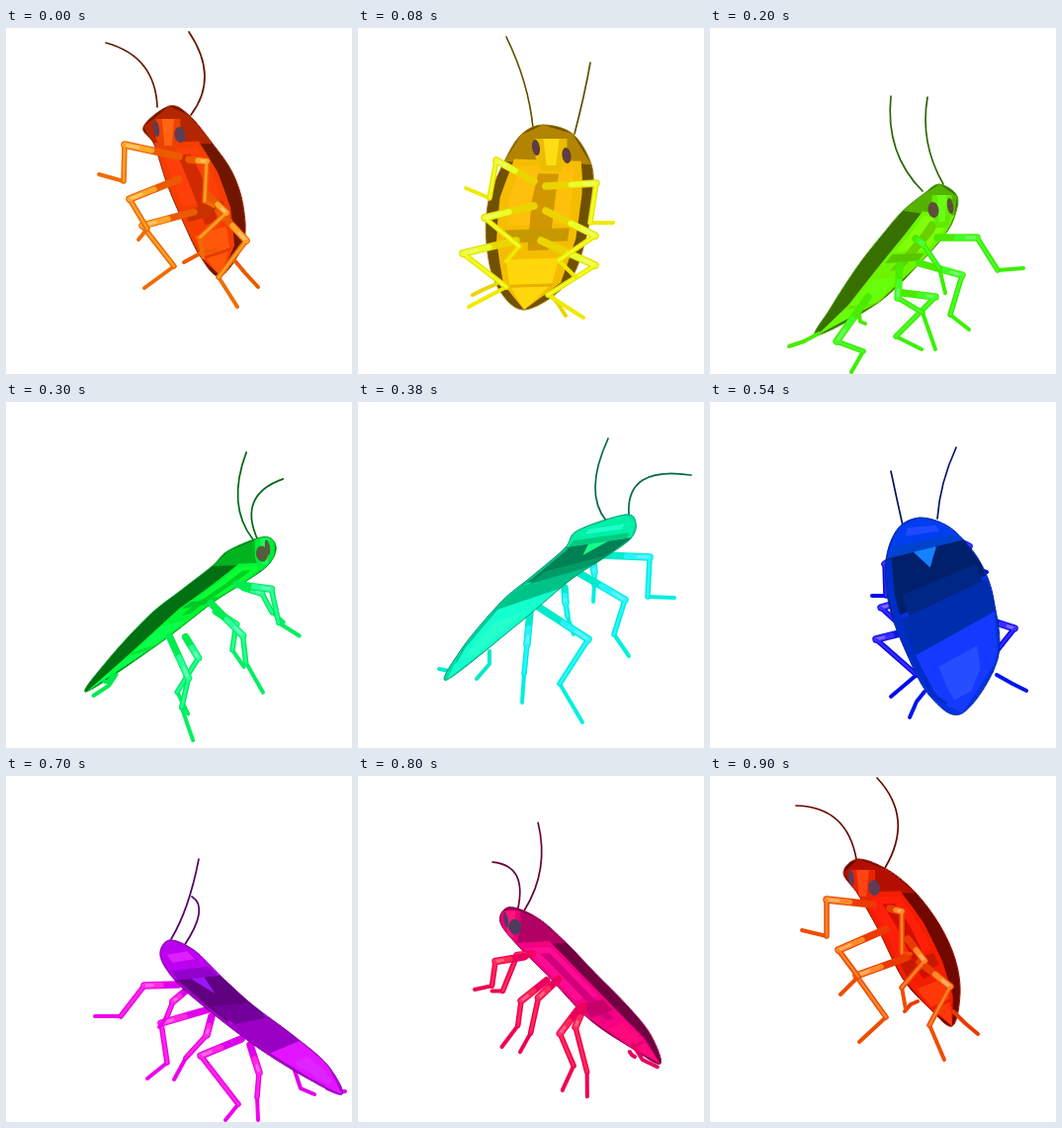
Recreate the animation shown at these times as an HTML page with a canvas. Size 350x350 px, loop 920 ms.

```html
<!DOCTYPE html>
<html lang="en">
<head>
<meta charset="utf-8">
<title>Turning cockroach</title>
<style>
html, body { margin: 0; width: 100%; height: 100%; overflow: hidden; background: #fff; }
canvas { display: block; }
</style>
</head>
<body>
<canvas id="stage" width="350" height="350"></canvas>
<script>
const LOOP = 920, STEP = 20;
const g = document.getElementById('stage').getContext('2d');
g.lineCap = g.lineJoin = 'round';

// Key poses, x,y pairs. Outline runs clockwise from head (0) to tail (6).
// Legs: hip, knee, ankle, foot. Feelers: base, middle, tip.
const poses = [];
const pose = (t, parts) => poses.push({ t, parts });

pose(0, {
  body: [165,79, 185,88, 209,117, 229,146, 240,180, 240,218, 217,251, 197,232, 180,198, 163,158, 150,118, 139,100],
  lFront: [175,130, 120,118, 119,155, 94,148],
  lMid: [175,153, 125,173, 143,203, 134,214],
  lHind: [190,186, 138,200, 170,241, 140,263],
  rFront: [185,133, 203,135, 201,175, 210,180],
  rMid: [205,170, 223,187, 196,212, 199,232],
  rHind: [215,185, 243,215, 215,252, 234,282],
  lTail: [212,225, 200,226, 180,237],
  rTail: [232,236, 242,248, 255,262],
  lFeeler: [153,80, 139,38, 101,15],
  rFeeler: [187,88, 201,48, 185,4],
  eyes: [152,102, 176,108]
});
pose(80, {
  body: [187,98, 217,107, 236,138, 237,170, 230,215, 212,258, 168,285, 140,260, 130,218, 132,175, 148,135, 165,108],
  lFront: [178,155, 140,134, 133,172, 109,162],
  lMid: [178,180, 128,192, 163,221, 150,236],
  lHind: [160,215, 106,228, 150,262, 112,282],
  rFront: [190,160, 241,157, 235,197, 258,197],
  rMid: [190,185, 240,210, 203,235, 220,252],
  rHind: [185,215, 240,240, 192,270, 228,293],
  lTail: [140,259, 128,264, 116,270],
  rTail: [195,270, 203,280, 210,291],
  lFeeler: [177,101, 168,55, 150,9],
  rFeeler: [219,107, 228,70, 235,35],
  eyes: [180,121, 211,129]
});
pose(200, {
  body: [232,158, 250,170, 247,192, 237,210, 215,235, 170,278, 108,311, 122,283, 150,240, 176,207, 195,185, 216,168],
  lFront: [208,213, 215,218, 232,243, 238,268],
  lMid: [192,240, 190,273, 215,288, 228,325],
  lHind: [160,272, 128,317, 155,327, 143,348],
  rFront: [230,212, 270,212, 291,245, 317,243],
  rMid: [212,238, 255,250, 243,290, 262,305],
  rHind: [195,268, 228,272, 188,312, 214,325],
  lTail: [150,284, 152,297, 157,299],
  rTail: [110,309, 95,317, 80,322],
  lFeeler: [215,165, 188,122, 183,69],
  rFeeler: [236,158, 220,115, 220,70],
  eyes: [226,184, 243,180]
});
pose(380, {
  body: [270,114, 281,122, 276,138, 250,157, 215,180, 165,222, 90,281, 106,248, 145,202, 175,177, 209,148, 222,130],
  lFront: [248,155, 295,157, 293,197, 320,198],
  lMid: [222,172, 270,200, 259,235, 274,257],
  lHind: [182,207, 233,240, 204,285, 227,324],
  rFront: [238,163, 239,172, 239,185, 238,202],
  rMid: [209,188, 210,203, 212,217, 218,235],
  rHind: [174,212, 171,245, 168,275, 166,304],
  lTail: [100,268, 92,272, 82,270],
  rTail: [133,252, 133,265, 120,280],
  lFeeler: [274,114, 288,79, 337,74],
  rFeeler: [251,120, 240,85, 253,37],
  eyes: [272,124, 268,118]
});
pose(540, {
  body: [212,117, 238,124, 257,140, 275,165, 287,200, 291,260, 255,315, 222,297, 197,250, 181,205, 178,160, 190,128],
  lFront: [250,140, 262,146, 262,165, 280,172],
  lMid: [265,190, 278,200, 275,215, 270,230],
  lHind: [280,220, 308,229, 285,258, 285,272],
  rFront: [190,155, 177,164, 178,196, 164,196],
  rMid: [200,200, 173,208, 195,228, 200,240],
  rHind: [200,232, 168,240, 209,276, 183,298],
  lTail: [290,276, 306,285, 320,292],
  rTail: [217,293, 209,303, 202,319],
  lFeeler: [230,118, 236,82, 249,46],
  rFeeler: [195,125, 189,98, 183,70],
  eyes: [225,125, 200,125]
});
pose(700, {
  body: [165,166, 190,176, 218,203, 250,232, 290,262, 325,292, 340,322, 305,306, 255,275, 205,237, 172,208, 156,182],
  lFront: [182,217, 169,228, 163,243, 155,254],
  lMid: [208,243, 203,262, 182,285, 170,307],
  lHind: [247,272, 256,300, 254,325, 255,348],
  rFront: [174,211, 140,212, 116,243, 90,243],
  rMid: [205,236, 157,250, 163,290, 143,306],
  rHind: [238,266, 197,283, 235,332, 222,348],
  lTail: [325,316, 335,320, 343,319],
  rTail: [292,298, 298,316, 312,322],
  lFeeler: [180,172, 195,140, 188,122],
  rFeeler: [167,165, 183,130, 195,84],
  eyes: [165,175, 160,178]
});
pose(900, {
  body: [150,84, 180,95, 208,118, 232,150, 248,185, 253,220, 245,253, 222,235, 195,205, 170,155, 150,120, 135,98],
  lFront: [165,130, 118,125, 118,162, 93,156],
  lMid: [178,155, 130,176, 150,203, 132,221],
  lHind: [198,184, 148,202, 178,244, 151,269],
  rFront: [182,134, 194,137, 194,179, 203,180],
  rMid: [200,165, 217,187, 194,214, 198,236],
  rHind: [212,188, 243,213, 222,252, 237,287],
  lTail: [210,228, 203,231, 197,238],
  rTail: [246,238, 258,250, 271,261],
  lFeeler: [148,84, 128,44, 87,30],
  rFeeler: [177,93, 190,45, 169,2],
  eyes: [143,103, 166,113]
});

const names = Object.keys(poses[0].parts);
const legs = ['rHind', 'rMid', 'rFront', 'lHind', 'lMid', 'lFront'];
const gap = (a, b) => (b.t - a.t + LOOP) % LOOP;

// Periodic cubic interpolation between the key poses.
function sample(t) {
  const n = poses.length;
  let i = n - 1;
  while (poses[i].t > t) i--;
  const [a, b, c, d] = [-1, 0, 1, 2].map(k => poses[(i + k + n) % n]);
  const h = gap(b, c), u = (t - b.t) / h, v = 1 - u;
  const h0 = h / (gap(a, b) + h), h1 = h / (h + gap(c, d));
  const out = {};
  for (const key of names) {
    out[key] = b.parts[key].map((p, k) => {
      const q = c.parts[key][k];
      const m0 = (q - a.parts[key][k]) * h0, m1 = (d.parts[key][k] - p) * h1;
      return v * v * (1 + 2 * u) * p + u * u * (3 - 2 * u) * q + u * v * (v * m0 - u * m1);
    });
  }
  return out;
}

let hue = 0;
const tone = (light, shift = 0, sat = 100) => `hsl(${hue + shift},${sat}%,${light}%)`;

function line(pts, width, color) {
  g.beginPath();
  for (let i = 0; i < pts.length; i += 2) g.lineTo(pts[i], pts[i + 1]);
  g.lineWidth = width;
  g.strokeStyle = color;
  g.stroke();
}

function fill(pts, color) {
  g.beginPath();
  for (const [x, y] of pts) g.lineTo(x, y);
  g.closePath();
  g.fillStyle = color;
  g.fill();
}

function feeler([ax, ay, mx, my, bx, by]) {
  g.beginPath();
  g.moveTo(ax, ay);
  g.quadraticCurveTo(2 * mx - (ax + bx) / 2, 2 * my - (ay + by) / 2, bx, by);
  g.lineWidth = 1.7;
  g.strokeStyle = tone(20);
  g.stroke();
}

function leg(p) {
  const mx = (p[0] + p[2]) / 2, my = (p[1] + p[3]) / 2;
  line(p.slice(4), 4, tone(47, 12));
  line(p.slice(2, 6), 5.5, tone(46, 12));
  line(p.slice(0, 4), 7.5, tone(46, 8));
  line([mx, my, p[2], p[3]], 5.5, tone(58, 20));
  line([(mx + p[2]) / 2, (my + p[3]) / 2, p[2], p[3]], 3, tone(70, 22));
  line(p.slice(2, 6), 2.5, tone(58, 18));
}

function outline(p) {
  const n = p.length / 2, at = i => [p[(i + n) % n * 2], p[(i + n) % n * 2 + 1]];
  g.beginPath();
  g.moveTo(p[0], p[1]);
  for (let i = 0; i < n; i++) {
    const [a, b, c, d] = [i - 1, i, i + 1, i + 2].map(at);
    g.bezierCurveTo(b[0] + (c[0] - a[0]) / 6, b[1] + (c[1] - a[1]) / 6,
      c[0] - (d[0] - b[0]) / 6, c[1] - (d[1] - b[1]) / 6, c[0], c[1]);
  }
}

// Point on the body: v from head to tail (0..6), u from left to right (0..1).
function spot(p, v, u) {
  const side = k => {
    const i = Math.floor(k), f = k - i, a = i % 12 * 2, b = (i + 1) % 12 * 2;
    return [0, 1].map(j => p[a + j] + (p[b + j] - p[a + j]) * f);
  };
  const r = side(v), l = side(12 - v);
  return [0, 1].map(j => l[j] + (r[j] - l[j]) * u);
}

function patch(p, v0, v1, u0, u1, color) {
  const left = [], right = [];
  for (let k = 0; k <= 8; k++) {
    const v = v0 + (v1 - v0) * k / 8;
    left.push(spot(p, v, u0));
    right.unshift(spot(p, v, u1));
  }
  fill(left.concat(right), color);
}

function belly(p, eyes, s) {
  const lo = Math.max(0, 0.1 + 0.35 * s), hi = Math.min(1, 0.9 + 0.2 * s);
  const across = k => lo + (hi - lo) * k;
  g.fillStyle = tone(22, -3);
  g.fill();
  patch(p, 0, 2, 0, 1, tone(35, -2));
  patch(p, 1.9, 6, lo, hi, tone(48));
  patch(p, 2.1, 3.6, across(0.12), across(0.88), tone(52, -2));
  patch(p, 2.3, 4.2, across(0.4), across(0.68), tone(41, -3));
  patch(p, 3.7, 4, across(0.1), across(0.9), tone(39));
  patch(p, 4.4, 6, across(0.1), across(0.85), tone(52, 4));
  patch(p, 5, 5.12, across(0.1), across(0.9), tone(45));
  const [ax, ay, bx, by] = eyes, x = (ax + bx) / 2, y = (ay + by) / 2;
  const w = Math.max(10, Math.hypot(bx - ax, by - ay) / 2);
  fill([[x - w, y - 13], [x + w, y - 13], [x + w, y + 6], [x + w * 0.6, y + 20], [x - w * 0.6, y + 20], [x - w, y + 6]], tone(46, 2));
  fill([[x - w * 0.5, y - 13], [x + w * 0.5, y - 13], [x + w * 0.3, y + 14], [x - w * 0.3, y + 14]], tone(54, 5));
  for (const [ex, ey, r] of [[ax, ay, 4 + 2 * s], [bx, by, 4.5 - 2 * s]]) {
    g.beginPath();
    g.ellipse(ex, ey, Math.max(1, r), 8, -0.15, 0, 7);
    g.fillStyle = tone(30, -60, 22);
    g.fill();
  }
}

function back(p, c) {
  const dark = 30 + 8 * (1 + c);
  g.fillStyle = tone(44);
  g.fill();
  patch(p, 1.9, 3.3, 0, 1, tone(dark - 9, -4));
  patch(p, 2.9, 3.6, 0.15, 0.95, tone(dark - 4, -4));
  patch(p, 3.4, 4.4, 0, 1, tone(dark + 4, -2));
  patch(p, 4.2, 6, 0, 1, tone(54, 4));
  patch(p, 4.6, 5.5, 0.25, 0.75, tone(57, 2));
  patch(p, 2, 5.5, 0, 0.07, tone(39));
  patch(p, 0, 1.95, 0, 1, tone(47, -2));
  patch(p, 1.6, 1.95, 0.05, 0.95, tone(40, -6));
  patch(p, 1, 1.3, 0.2, 0.8, tone(56, 2));
  fill([spot(p, 1.95, 0.35), spot(p, 1.95, 0.65), spot(p, 2.5, 0.5)], tone(54, -14));
}

function draw(t) {
  const turn = 2 * Math.PI * (t - 80) / LOOP, c = Math.cos(turn), s = Math.sin(turn);
  const q = sample(t), under = c > 0;
  hue = 15 + 360 * t / LOOP;
  g.clearRect(0, 0, 350, 350);
  feeler(q.lFeeler);
  feeler(q.rFeeler);
  const limbs = () => {
    line(q.lTail, 4, tone(46, 8));
    line(q.rTail, 4, tone(46, 8));
    legs.forEach(k => leg(q[k]));
  };
  if (!under) limbs();
  g.save();
  outline(q.body);
  g.clip();
  if (under) belly(q.body, q.eyes, s);
  else back(q.body, c);
  g.restore();
  outline(q.body);
  g.lineWidth = 1;
  g.strokeStyle = tone(30);
  g.stroke();
  if (under) limbs();
}

const start = performance.now();
function tick() {
  const t = (performance.now() - start) % LOOP;
  draw(Math.floor(t / STEP) * STEP);
  requestAnimationFrame(tick);
}
tick();
</script>
</body>
</html>
```
